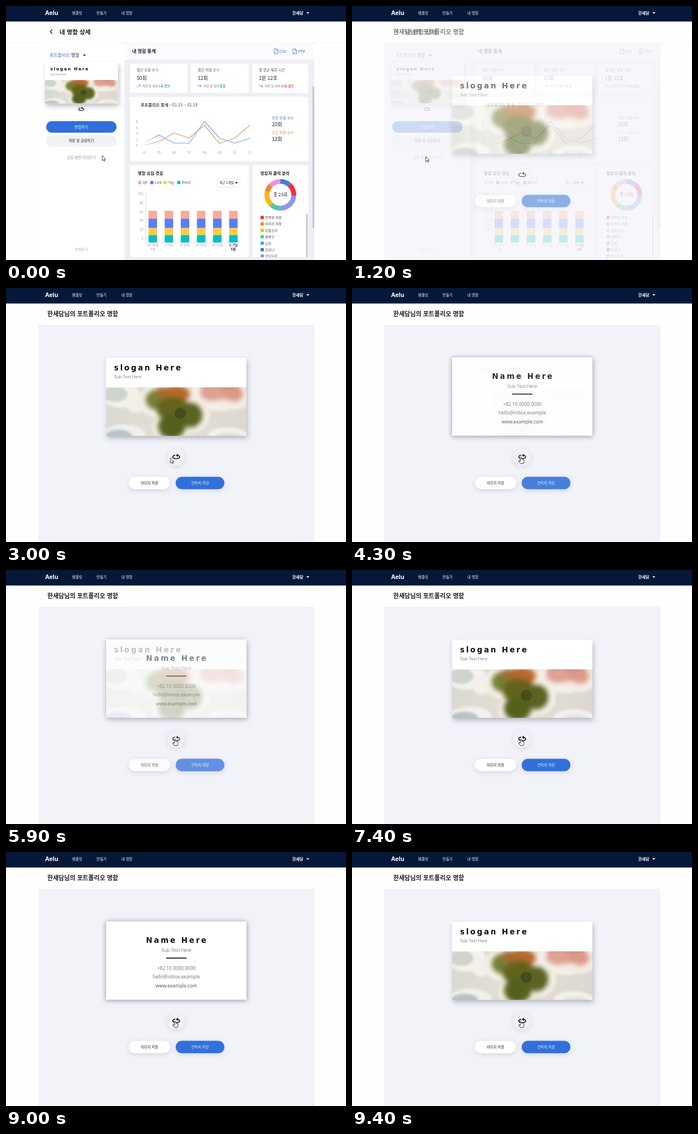
An HTML page for the animation above (10000 ms loop, 601 px wide and 450 px high).

```html
<!DOCTYPE html>
<html lang="ko">
<head>
<meta charset="utf-8">
<style>
  html, body { margin: 0; width: 100%; height: 100%; overflow: hidden; background: #fefefe; }
  svg { display: block; font-family: "Noto Sans CJK KR", "Noto Sans CJK JP", "Noto Sans CJK", "Noto Sans", sans-serif; }
  text { white-space: pre; }
  .wide { font-family: "DejaVu Sans", sans-serif; }
  .sub { font-family: Inter, sans-serif; }
  .contact { font-family: "Noto Sans", sans-serif; }
</style>
</head>
<body>
<svg id="stage" width="601" height="450" viewBox="0 0 601 450"></svg>
<script>
const INK = '#1d1f26', BLUE = '#326fd9', ORANGE = '#ee8a35', GREY = '#9a9ca3';

const rect = (x, y, w, h, fill, rx = 0, extra = '') =>
  `<rect x="${x}" y="${y}" width="${w}" height="${h}" rx="${rx}" fill="${fill}" ${extra}/>`;
const text = (x, y, size, str, fill = INK, weight = 400, anchor = 'start', extra = '') =>
  `<text x="${x}" y="${y}" font-size="${size}" fill="${fill}" font-weight="${weight}" text-anchor="${anchor}" ${extra}>${str}</text>`;
const mid = (x, y, size, str, fill, weight, extra) => text(x, y, size, str, fill, weight, 'middle', extra);
const line = (d, stroke, width = 1, extra = '') =>
  `<path d="${d}" fill="none" stroke="${stroke}" stroke-width="${width}" stroke-linejoin="round" ${extra}/>`;
const tri = (x, y, fill = INK) => `<path d="M${x} ${y}h5l-2.5 3z" fill="${fill}"/>`;
const blob = (x, y, rx, ry, fill) => `<ellipse cx="${x}" cy="${y}" rx="${rx}" ry="${ry}" fill="${fill}"/>`;
const group = (body, attrs) => `<g ${attrs}>${body}</g>`;

const defs = `<defs>
  <clipPath id="art"><rect width="248" height="86"/></clipPath>
  <clipPath id="legend"><rect x="440" y="365" width="90" height="80"/></clipPath>
  <filter id="soft" x="-20%" y="-20%" width="140%" height="140%"><feGaussianBlur stdDeviation="2.2"/></filter>
  <filter id="softer" x="-30%" y="-30%" width="160%" height="160%"><feGaussianBlur stdDeviation="4"/></filter>
  <filter id="drop" x="-20%" y="-30%" width="140%" height="170%"><feDropShadow dx="2" dy="5" stdDeviation="4.5" flood-color="#3a4058" flood-opacity=".33"/></filter>
  <filter id="around" x="-20%" y="-30%" width="140%" height="170%"><feDropShadow dx="0" dy="1" stdDeviation="4.5" flood-color="#22242c" flood-opacity=".5"/></filter>
  <filter id="lift" x="-30%" y="-60%" width="160%" height="260%"><feDropShadow dx="0" dy="2" stdDeviation="4" flood-color="#59617e" flood-opacity=".22"/></filter>
  <linearGradient id="beige" x2="1"><stop stop-color="#d9d9d2"/><stop offset=".5" stop-color="#e5dfd4"/><stop offset="1" stop-color="#dcd8d0"/></linearGradient>
  <linearGradient id="fade" x2="1"><stop stop-color="#fff"/><stop offset="1" stop-color="#fff" stop-opacity="0"/></linearGradient>
</defs>`;

// Soft flower shapes, 248 x 86
const art = group(
  rect(0, 0, 248, 86, 'url(#beige)') +
  group(
    blob(25, 12, 34, 24, '#f4f2ec') + blob(52, 28, 17, 17, '#f3f0e9') + blob(16, 12, 22, 14, '#cfd4cf') +
    blob(200, 8, 48, 34, '#f5efe9') + blob(225, 20, 28, 20, '#f3ece5') +
    blob(90, 24, 33, 29, '#f3efe6') + blob(122, 16, 34, 26, '#f2ece2') +
    blob(151, 50, 32, 31, '#f2eee4') + blob(115, 72, 34, 28, '#efebdf') +
    blob(215, 86, 36, 15, '#f4f2ed') + blob(32, 84, 38, 18, '#f1f0ec') + blob(22, 86, 24, 11, '#b9c3c2'),
    'filter="url(#soft)"') +
  group(
    blob(202, 1, 34, 20, '#d58b78') + blob(188, 10, 22, 14, '#dda293') + blob(226, 12, 16, 13, '#dc9a88') +
    blob(90, 22, 20, 18, '#758036') + blob(123, 12, 25, 16, '#b8672b') + blob(100, 8, 14, 9, '#a46a30') +
    blob(118, 38, 29, 22, '#63631d') + blob(149, 49, 21, 22, '#5c6322') + blob(116, 69, 24, 22, '#54601f') +
    blob(218, 90, 24, 8, '#d3d8d6'),
    'filter="url(#softer)"') +
  blob(131, 46, 10, 10, '#33381c88'),
  'clip-path="url(#art)"');

const spinIcon = (x, y, s = 1) => group(
  line('M-2 -2.5C-7 -2 -8 2 -3 3.2C2 4.4 7 2.6 6 0C5.6 -1.2 4 -2 2.5 -2.3', '#111', 1.5) +
  '<path d="M-1 -2.4L3 -5.2V.4Z" fill="#111"/>',
  `transform="translate(${x} ${y}) scale(${s})"`);
const sortIcon = (x, y, color = BLUE) => line(`M${x} ${y}l2.2 -2.2l2.2 2.2l-2.2 2.2z`, color, .8);
const slogan = (x, y, size, gap) =>
  text(x, y, size, 'slogan Here', '#111', 700, 'start', `class="wide" letter-spacing="${gap}"`);

function header() {
  return rect(0, 0, 601, 27.5, '#06183a') +
    text(69, 16, 10.5, 'Aelu', '#fff', 700, 'start', 'class="sub"') +
    text(117, 14.7, 6.4, '템플릿', '#fff') + text(160, 14.7, 6.4, '만들기', '#fff') +
    text(204, 14.7, 6.4, '내 명함', '#fff') + text(506, 15, 7.1, '한새담', '#fff', 700) + tri(531, 11, '#fff');
}

function sidePanel() {
  const card = rect(69, 99, 128.5, 73.5, '#fff', 0, 'filter="url(#drop)"') +
    slogan(78.5, 113.5, 7.5, 1.6) +
    text(78.5, 122.5, 4.2, 'Sub Text Here', '#888', 400, 'start', 'class="sub"') +
    group(art, 'transform="translate(69 131) scale(.518 .483)"');
  return rect(57, 66, 152, 384, '#fff') +
    text(77, 90.3, 7.8, `<tspan fill="${BLUE}">포트폴리오</tspan> 명함`) + tri(136, 86) +
    card + spinIcon(133, 182.5, .75) +
    rect(71, 204, 124.5, 20.5, BLUE, 10.2) + mid(133, 216.7, 6.5, '편집하기', '#fff') +
    rect(71, 229, 124.5, 20, '#f1f2f5', 10) + mid(133, 241.3, 6.4, '저장 및 공유하기', INK, 500) +
    mid(133, 270.7, 6.4, '공유 화면 미리보기', '#8d8f96') + mid(133, 433.7, 6.5, '삭제하기', '#b2b4ba');
}

function statCard(x, w, label, value, color, arrow, note, sortX) {
  return rect(x, 102, w, 52, '#fff', 3) +
    text(x + 12, 115.7, 6.3, label, '#55575f') + (sortX ? sortIcon(sortX, 113.3) : '') +
    text(x + 12, 131.2, 8.7, value, INK, 500) +
    group(line(arrow, color, .9), `transform="translate(${x + 12} 141.5)"`) +
    text(x + 22, 143.7, 5.35, `저번 달 대비 <tspan fill="${color}" font-weight="700">${note}</tspan>`, '#777980');
}

function lineChart() {
  const plot = (ys, color) =>
    line('M' + ys.map((y, i) => `${243.5 + i * 26.8} ${y}`).join('L'), color, 1.2);
  let out = rect(219, 161, 315, 114, '#fff', 3) +
    text(238, 178.3, 7.3, '<tspan font-weight="700">포트폴리오 통계 -</tspan> 01.13 ~ 01.19', '#44464e');
  [8, 6, 4, 2, 0].forEach((n, i) => out += text(230, 207 + i * 10.5, 5.8, n, GREY));
  ['-4', '05', '06', '07', '08', '09', '10', '11'].forEach((s, i) =>
    out += mid(243.5 + i * 26.8, 262.3, 5.6, s, GREY));
  out += plot([243, 228.5, 243, 243, 204.5, 234, 243, 234.5], '#7f9fe2') +
    plot([247, 240, 225, 234, 211, 243.5, 234, 211.5], '#dd9a68') +
    rect(241, 222, 24, 28, 'url(#fade)');
  [['주간 조회 수', '20회', BLUE], ['주간 저장 수', '12회', ORANGE]].forEach(([label, n, c], i) =>
    out += text(470, 201 + i * 25.8, 6.3, label, c, 500) + sortIcon(503, 198.6 + i * 25.8, c) +
      text(470, 212.8 + i * 25.8, 8.8, n, INK, 500));
  return out;
}

function barChart() {
  const kinds = [['QR', '#fba997', 233.5], ['Link', '#5c7cfa', 255], ['Tag', '#ffcb45', 278.5], ['Direct', '#05bfc0', 302.5]];
  const edges = [363, 377, 393, 406, 419];
  const days = ['28~30일', '1~7일', '8~15일', '16~21일', '16~21일', '1~7일'];
  let out = rect(219, 282, 210, 163, '#fff', 3) + text(233, 298.6, 7.4, '명함 유입 경로', INK, 700) +
    rect(373.5, 306, 40, 14.5, '#fff', 1, 'stroke="#e0e1e6" stroke-width=".8"') +
    text(377.5, 315.3, 5.5, '최근 1개월', INK, 500) + tri(404.7, 312);
  kinds.forEach(([name, c, x]) => out += rect(x, 310, 5.6, 5.6, c) + text(x + 8, 315.3, 6, name, '#55575f'));
  for (let i = 0; i < 6; i++) out += text(242.5, 335.3 + i * 15.7, 5.6, 100 - i * 20, GREY, 400, 'end');
  out += line('M247 333V419H415', '#cfd1d8', .8);
  days.forEach((day, i) => {
    const x = 259.5 + i * 28.5, last = i == 5, c = last ? INK : GREY, w = last ? 700 : 400;
    kinds.forEach(([, fill], k) => out += rect(x - 7.5, edges[k], 15, edges[k + 1] - edges[k], fill));
    out += mid(x, 425.6, 5.5, day, c, w);
    if (!i || last) out += mid(x, 433.4, 5.5, last ? '6월' : '5월', c, w);
  });
  return out;
}

function donut() {
  const parts = [[12, '#4b7ddb'], [14, '#f52c40'], [24, '#8b97ee'], [12, '#5bc3a9'], [17, '#fdb515'], [8, '#ef8a2b'], [13, '#f093dc']];
  const rows = [['연락처 저장', '#f52c40'], ['이미지 저장', '#ef8a2b'], ['보들소리', '#fdb515'], ['솔바구', '#5bc3a9'],
    ['도핀', '#4ba0ee'], ['포로니', '#4470d6'], ['보늬누리', '#8b8eec']];
  let out = rect(436, 282, 98, 163, '#fff', 3) + text(450, 298.6, 7.3, '방문자 클릭 분석', INK, 700), at = 0;
  parts.forEach(([n, c]) => {
    out += `<circle cx="485" cy="334.5" r="23.7" fill="none" stroke="${c}" stroke-width="8.6" pathLength="100"
      stroke-dasharray="${n} ${100 - n}" stroke-dashoffset="${-at}" transform="rotate(-90 485 334.5)"/>`;
    at += n;
  });
  out += mid(485, 337.3, 7.5, '총 23회', '#5b5d66', 700);
  const list = rows.map(([name, c], i) => {
    const y = 374.7 + i * 11.4;
    return rect(450, y - 2.9, 5.8, 5.8, c) + text(458, y + 2.3, 6, name, '#44464e');
  }).join('');
  return out + group(list, 'clip-path="url(#legend)"') + rect(531, 368, 2, 77, '#b5b7c0', 1);
}

function dashboard() {
  const file = x => line(`M${x} 76h4.5l2.3 2.3v6.5h-6.8zM${x + 4.3} 76v2.5h2.5M${x + 1.8} 82h3.2`, BLUE, .8);
  return line('M82 41.5L78 45.5L82 49.5', INK, 1.2) + text(94.5, 49.6, 10.7, '내 명함 상세', INK, 700) +
    line('M0 65.5H601', '#f3f4f7') + sidePanel() +
    rect(209, 66, 336, 384, '#eeeff5') + rect(209, 66, 336, 29, '#fbfbfd') +
    text(223, 83.2, 8.1, '내 명함 통계', INK, 700) +
    file(474) + text(483, 82.8, 6.8, 'CSV', BLUE, 500) + file(507) + text(516.5, 82.8, 6.8, 'PDF', BLUE, 500) +
    statCard(219, 102, '월간 조회 수', '50회', '#2f8fd6', 'M0 2L2 0L3.5 1.2L6.5 -1.8M4.3 -1.8H6.5V.3', '1회 증가', 264.5) +
    statCard(327, 102, '월간 저장 수', '12회', '#16a98e', 'M0 0H6.5M4.6 -1.8L6.5 0L4.6 1.8', '동일', 372.5) +
    statCard(435, 99, '월 평균 체류 시간', '1분 12초', '#d9455c', 'M0 -2L2 0L3.5 -1.2L6.5 1.8M4.3 1.8H6.5V-.3', '10초 감소') +
    lineChart() + barChart() + donut() + rect(541.8, 142, 3, 251, '#c3c6d2', 1.5);
}

function controls() {
  return group('<circle cx="300.5" cy="299.5" r="15.5" fill="#f0f1f6"/>', 'filter="url(#lift)" opacity=".8"') +
    spinIcon(301, 298.8) +
    rect(217, 334.8, 73, 21.4, '#fff', 10.7, 'filter="url(#lift)"') + mid(253.5, 347.8, 6.4, '이미지 저장', INK, 500) +
    rect(300, 334.5, 86, 22, BLUE, 11, 'filter="url(#lift)"') + mid(343, 347.8, 6.4, '연락처 저장', '#e9f0ff');
}

function frontSide() {
  return rect(177, 123.5, 248, 138, '#fff', 0, 'filter="url(#drop)"') + slogan(191, 146, 13.3, 2.8) +
    text(191, 160.2, 7.2, 'Sub Text Here', '#808289', 400, 'start', 'class="sub"') +
    group(art, 'transform="translate(177 176)"') + controls();
}

function backSide() {
  const row = (y, s, c) => mid(301, y, 8.3, s, c, 400, 'class="contact"');
  return rect(177, 123, 248, 138.5, '#fff', 0, 'filter="url(#around)"') +
    mid(302.3, 160.5, 13.3, 'Name Here', '#111', 700, 'class="wide" letter-spacing="2.9"') +
    mid(301, 177.2, 7.9, 'Sub Text Here', '#808289', 400, 'class="sub"') + rect(283, 187, 36, 1.8, '#222') +
    row(208.5, '+82 10 0000 0000', '#777') + row(224.3, 'hello@inbox.example', '#777') +
    row(240.2, 'www.example.com', '#555') + controls();
}

const stage = document.getElementById('stage');
stage.innerHTML = defs + rect(0, 0, 601, 450, '#fefefe') + group(dashboard(), 'id="dash"') +
  group(
    text(73, 50, 10.8, '한새담님의 포트폴리오 명함', INK, 700) + rect(57, 65, 488, 385, '#f2f3f9') +
    group(frontSide(), 'id="front"') + group(backSide(), 'id="back"'), 'id="detail"') +
  header() +
  group('<path d="M0 0V9L2 7.2L3.4 10.2L4.9 9.5L3.5 6.6H6.2Z" fill="#fff" stroke="#222" stroke-width=".8"/>', 'id="arrow"') +
  group('<path d="M-1 1Q0 -.8 1 1V4.2Q2 3.5 2.7 4.5Q3.8 4 4.3 5Q5.4 4.7 5.5 6V8.6L4.4 12H-.8L-3.7 8.2Q-4 6.6 -2.5 7L-1 8.2Z" fill="#fff" stroke="#222" stroke-width=".9"/>',
    'id="hand" transform="translate(298.5 299)"');

const [dash, detail, front, back, arrow, hand] =
  ['dash', 'detail', 'front', 'back', 'arrow', 'hand'].map(id => document.getElementById(id));
const ramp = (t, a, b) => Math.min(1, Math.max(0, (t - a) / (b - a)));
const ease = p => p * p * (3 - 2 * p);
const show = (el, alpha) => {
  el.setAttribute('opacity', alpha);
  el.style.display = alpha > 0 ? '' : 'none';
};

function draw(now) {
  const t = Math.floor(now % 10000 / 100) * 100; // ten steps a second
  const page = ease(ramp(t, 950, 1420));
  const flip = ease(ramp(t, 3950, 4400)) - ease(ramp(t, 5750, 6050)) +
    ease(ramp(t, 7400, 7800)) - ease(ramp(t, 9000, 9400));
  show(dash, 1 - page);
  show(detail, page);
  show(front, 1 - flip);
  show(back, flip);

  const left = ease(ramp(t, 0, 600)), over = 1 - (1 - ramp(t, 2300, 3300)) ** 2.6;
  arrow.setAttribute('transform', `translate(${170 - 39.5 * left + 167.5 * over} ${265 + 1.7 * left + 36 * over})`);
  show(arrow, t < 3300 ? 1 : 0);
  show(hand, t < 3300 ? 0 : 1);
  requestAnimationFrame(draw);
}
requestAnimationFrame(draw);
</script>
</body>
</html>
```
